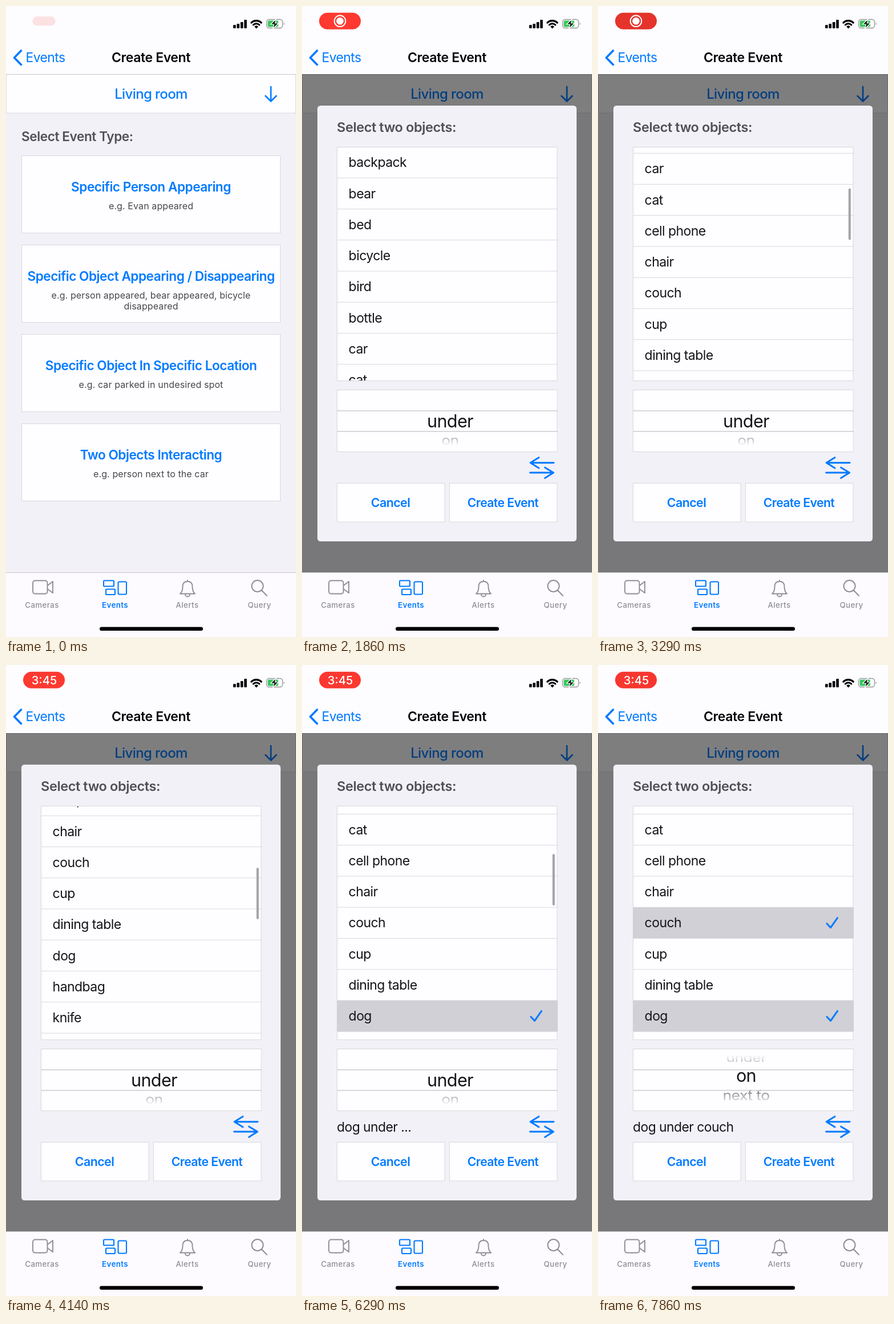
Animation of 508 by 1102 pixels, one loop 8 s. Source, as an HTML page:

```html
<!DOCTYPE html>
<html lang="en">
<head>
<meta charset="utf-8">
<title>Create Event</title>
<style>
html, body { margin: 0; width: 100%; height: 100%; overflow: hidden; background: #f2f1f8; }
svg { display: block; width: 100%; height: 100%; }
text { font-family: Inter, "Open Sans", sans-serif; white-space: pre; }
.line { fill: none; stroke-linecap: round; stroke-linejoin: round; }
.box { fill: #fefdff; stroke: #d9d8de; }
</style>
</head>
<body>
<svg id="stage" viewBox="0 0 508 1102" xmlns="http://www.w3.org/2000/svg"></svg>
<script>
const BLUE = '#007aff', GRAY = '#8e8e93', INK = '#151518', DARK = '#504f55';
const ROW = 54.25, LIST_TOP = 246;
const FPS = 7, LOOP = 8000;
const items = ['backpack', 'bear', 'bed', 'bicycle', 'bird', 'bottle', 'car', 'cat',
  'cell phone', 'chair', 'couch', 'cup', 'dining table', 'dog', 'handbag', 'knife',
  'laptop', 'person'];
const relations = ['under', 'on', 'next to'];

const text = (s, x, y, size, fill, { weight = 400, anchor = 'start', track = -0.024, id = '' } = {}) =>
  `<text ${id && `id="${id}"`} x="${x}" y="${y}" font-size="${size}" fill="${fill}" font-weight="${weight}"
    text-anchor="${anchor}" letter-spacing="${(track * size).toFixed(2)}">${s}</text>`;
const mid = (s, x, y, size, fill, weight = 600, track = -0.025) =>
  text(s, x, y, size, fill, { weight, anchor: 'middle', track });
const line = (d, color, width) =>
  `<path class="line" d="${d}" stroke="${color}" stroke-width="${width}"/>`;
const rect = (x, y, w, h, fill, rx = 0, more = '') =>
  `<rect x="${x}" y="${y}" width="${w}" height="${h}" fill="${fill}" rx="${rx}" ${more}/>`;
const box = (x, y, w, h) => `<rect class="box" x="${x}" y="${y}" width="${w}" height="${h}"/>`;
const frame = (x, y, w, h, color, width, rx) =>
  rect(x, y, w, h, 'none', rx, `stroke="${color}" stroke-width="${width}"`);

function statusBar() {
  const bars = [6, 8, 11, 15].map((h, i) => rect(398 + i * 6.4, 39 - h, 4.6, h, '#000', 1.2)).join('');
  const wifi = line('M429.8 29.2A12.5 12.5 0 0 1 447.2 29.2', '#000', 3.2) +
    line('M433.2 33A7.5 7.5 0 0 1 443.8 33', '#000', 3) +
    '<path d="M438.5 39.5l-3.4-3.6a5 5 0 0 1 6.8 0z"/>';
  const battery = rect(456.5, 23.5, 28, 15, '#fdfcff', 4.5, 'stroke="#98989c" stroke-width="1.4"') +
    rect(458.5, 25.5, 18.5, 11, '#35c759', 2.5) +
    '<path d="M486.5 28.5q2.4 2.5 0 5z" fill="#98989c"/>' +
    '<path d="M473 23l-9.5 9h6l-2 7.5 9.8-9.5h-6z" stroke="#fff" stroke-width="1.2"/>';
  const pill = `<g id="pill">${rect(-36.5, -14.5, 73, 29, '#ff3b30', 14.5, 'id="pillBg"')}
    <g id="dot"><circle r="9.8" fill="none" stroke="#fff" stroke-width="2"/><circle r="6.3" fill="#fff"/></g>
    <g id="clock">${mid('3:45', 0.5, 7.4, 20.3, '#fff', 500, 0)}</g></g>`;
  return bars + wifi + battery + pill;
}

function header() {
  return rect(0, 0, 508, 119, '#fdfcff') +
    line('M26.5 78L14.5 90.2L26.5 102.4', BLUE, 3.6) +
    text('Events', 34.5, 98.2, 22.9, BLUE) +
    mid('Create Event', 254, 98.2, 23, '#050507', 600, -0.017) + statusBar();
}

function card(i, title, notes) {
  const y = 261.5 + i * 156;
  return box(27.5, y, 453, 135) + mid(title, 254, y + 62, 22.6, BLUE, 600, -0.021) +
    notes.map((n, k) => mid(n, 254, y + 93 + k * 19.5, 16, '#47464b', 400, 0.006)).join('');
}

function page() {
  return rect(0, 119, 508, 872, '#f2f1f8') + box(0.5, 119.5, 507, 67.5) +
    line('M0 119.5H508', '#c6c5ca', 1) +
    mid('Living room', 254, 162.3, 24, BLUE, 500) +
    line('M464 141V166.5M454.5 157L464 166.5L473.5 157', BLUE, 2.6) +
    text('Select Event Type:', 27, 235.8, 22.6, DARK, { weight: 600, track: -0.018 }) +
    card(0, 'Specific Person Appearing', ['e.g. Evan appeared']) +
    card(1, 'Specific Object Appearing / Disappearing',
      ['e.g. person appeared, bear appeared, bicycle', 'disappeared']) +
    card(2, 'Specific Object In Specific Location', ['e.g. car parked in undesired spot']) +
    card(3, 'Two Objects Interacting', ['e.g. person next to the car']);
}

function tabs() {
  const label = (s, x, color, weight) => mid(s, x, 1050.5, 13.3, color, weight, 0.03);
  return rect(0, 989, 508, 113, '#fdfbff') + line('M0 989.5H508', '#c6c5ca', 1) +
    frame(47, 1003.5, 25.5, 23, GRAY, 1.9, 4) +
    line('M73 1012L82 1005V1025L73 1018.5', GRAY, 1.9) +
    frame(171, 1003.5, 18, 10, BLUE, 2.1, 1.5) +
    frame(175, 1018.5, 16, 9.5, BLUE, 2.1, 1.5) +
    frame(196.5, 1005.5, 14.5, 22, BLUE, 2.1, 2) +
    line('M305 1026.5C309 1023 309.5 1019 309.5 1014C309.5 1008 313 1005 318 1005C323 1005 326.5 1008 326.5 1014' +
      'C326.5 1019 327 1023 331 1026.5ZM318 1005V1003M314 1027.5A4 4 0 0 0 322 1027.5', GRAY, 1.9) +
    line('M450.5 1013A10 10 0 1 1 430.5 1013A10 10 0 1 1 450.5 1013M447.6 1020.3L457 1029.7', GRAY, 2) +
    label('Cameras', 63, GRAY, 500) + label('Events', 191, BLUE, 600) +
    label('Alerts', 317.5, GRAY, 500) + label('Query', 444, GRAY, 500) +
    rect(164, 1084.5, 181, 6.5, '#000', 3.2);
}

function list() {
  const rows = items.map((name, i) => {
    const y = LIST_TOP + i * ROW;
    return rect(61, y, 387, ROW, '#d1d0d6', 0, `id="sel-${name}" opacity="0"`) +
      line(`M61 ${y + ROW}H448`, '#d9d8de', 1) +
      text(name, 81.6, y + 35.3, 23, INK) +
      `<g id="tick-${name}" opacity="0">${line(`M401 ${y + 28.5}L407.5 ${y + 35.5}L419.5 ${y + 18.5}`, BLUE, 3)}</g>`;
  }).join('');
  return box(61.5, 246.5, 385.5, 408) +
    `<g clip-path="url(#listClip)"><g id="rows">${rows}</g>
    ${rect(438.7, 0, 4.2, 90, '#a6a5aa', 2.1, 'id="bar"')}</g>`;
}

function picker() {
  const wheel = (kind, size, fill) => relations.map((s, i) =>
    `<g id="${kind}${i}">${mid(s, 259.5, size * 0.352, size, fill, 400, -0.022)}</g>`).join('');
  return box(61.5, 670.5, 385.5, 108) +
    `<g clip-path="url(#wheelClip)">${wheel('far', 26.6, '#222')}</g>` +
    rect(62, 671, 384.5, 36, 'url(#fadeUp)') + rect(62, 743, 384.5, 35, 'url(#fadeDown)') +
    `<g clip-path="url(#bandClip)">${wheel('near', 30.6, INK)}</g>` +
    line('M62 707H447M62 743H447', '#b3b2b7', 1.1);
}

function dialog() {
  return `<g id="modal">${rect(0, 119, 508, 870.5, '#000', 0, 'opacity=".5"')}
    ${rect(27, 174, 454, 761, '#f2f1f8', 5.5)}` +
    text('Select two objects:', 61, 219.7, 23.5, DARK, { weight: 600, track: -0.017 }) +
    list() + picker() +
    text('', 61, 815, 22.9, INK, { id: 'phrase' }) +
    line('M441 797.8H400M415 788.5L400 797.8L415 807M399.5 815H440.5M425.5 806L440.5 815L425.5 824.5', BLUE, 2.9) +
    box(61.5, 833.5, 188.5, 67.5) + box(258.5, 833.5, 188.5, 67.5) +
    mid('Cancel', 155, 875, 21.3, BLUE) + mid('Create Event', 352, 875, 21.1, BLUE) + '</g>';
}

const fade = (id, y1, y2) => `<linearGradient id="${id}" x1="0" x2="0" y1="${y1}" y2="${y2}">
  <stop offset="0" stop-color="#fefdff" stop-opacity=".42"/>
  <stop offset=".72" stop-color="#fefdff"/></linearGradient>`;
const clip = (id, body) => `<clipPath id="${id}">${body}</clipPath>`;

document.getElementById('stage').innerHTML = '<defs>' + fade('fadeDown', 0, 1) + fade('fadeUp', 1, 0) +
  clip('listClip', rect(61, 247, 387, 407)) + clip('bandClip', rect(62, 707, 385, 36)) +
  clip('wheelClip', rect(62, 671, 385, 36) + rect(62, 743, 385, 35)) + '</defs>' +
  page() + header() + dialog() + tabs();

const $ = id => document.getElementById(id);
const put = (id, name, value) => $(id).setAttribute(name, value);
const ramp = (t, from, span) => Math.min(1, Math.max(0, (t - from) / span));
const flick = (t, from, span) => 1 - (1 - ramp(t, from, span)) ** 3;
const mix = (a, b, p) => a + (b - a) * p;

function drawPill(t) {
  const grow = flick(t, 0, 0.5);
  const glow = 0.5 + 0.5 * Math.cos((t - 1.9) * 2 * Math.PI / 2.1);
  put('pill', 'transform', `translate(66.5 26.3) scale(${mix(0.55, 1, grow)})`);
  put('pill', 'opacity', mix(0.13, 1, grow));
  put('pillBg', 'fill', `rgb(${mix(220, 255, glow)},${mix(50, 57, glow)},${mix(42, 48, glow)})`);
  const showClock = ramp(t, 3.3, 0.25);
  put('dot', 'opacity', grow * (1 - showClock));
  put('clock', 'opacity', showClock);
}

function drawList(t) {
  const scroll = 219.7 * flick(t, 2.15, 1) + 251.3 * flick(t, 3.14, 1) - 105.7 * flick(t, 5, 1.19);
  put('rows', 'transform', `translate(0 ${-scroll})`);
  put('bar', 'y', 247.4 + 0.2264 * scroll);
  const shown = (from, to) => ramp(t, from, 0.05) * (1 - ramp(t, to, 0.3));
  put('bar', 'opacity', Math.max(shown(2.14, 4.4), shown(4.98, 6.4)));
  const picked = { dog: t >= 4.6, couch: t >= 6.8 };
  for (const name in picked) {
    put('sel-' + name, 'opacity', +picked[name]);
    put('tick-' + name, 'opacity', +picked[name]);
  }
  $('phrase').textContent = picked.couch ? 'dog under couch' : picked.dog ? 'dog under ...' : '';
}

function drawPicker(t) {
  const pos = 1.22 * flick(t, 7.4, 0.45);
  relations.forEach((_, i) => {
    const angle = (i - pos) * 35 * Math.PI / 180;
    const squash = Math.cos(angle);
    const move = `translate(0 ${725.2 + 57.5 * Math.sin(angle)}) scale(1 ${Math.max(0.01, squash)})`;
    for (const kind of ['far', 'near']) {
      put(kind + i, 'transform', move);
      put(kind + i, 'opacity', squash > 0.5 ? 1 : 0);
    }
  });
}

function draw(ms) {
  const t = Math.floor((ms % LOOP) * FPS / 1000 + 0.035) / FPS;
  drawPill(t);
  put('modal', 'opacity', ramp(t, 0.7, 0.28));
  drawList(t);
  drawPicker(t);
}

const start = performance.now();
function tick() {
  draw(performance.now() - start);
  requestAnimationFrame(tick);
}
tick();
</script>
</body>
</html>
```
